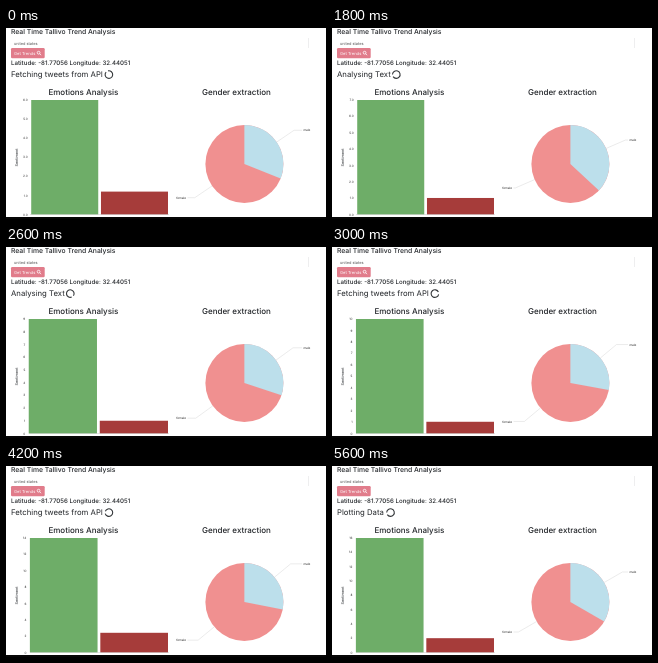
Animation, 320 px wide and 191 px high, one loop 5.7 s. Source, as an HTML page:

```html
<!DOCTYPE html>
<html lang="en">
<head>
<meta charset="utf-8">
<title>Trend Analysis</title>
<style>
  html, body { margin: 0; width: 100%; height: 100%; overflow: hidden; background: #fff; }
  svg {
    display: block; width: 100%; height: 100%; fill: #222529;
    font-family: Inter, "Liberation Sans", sans-serif; text-rendering: geometricPrecision;
  }
  .medium { font-weight: 500; }
  .heading { font-size: 8px; font-weight: 500; text-anchor: middle; }
  .small { font-size: 3.1px; fill: #333; }
  .end { text-anchor: end; }
  .leader { fill: none; stroke: #ccc; stroke-width: .4; }
</style>
</head>
<body>
<svg viewBox="0 0 320 191">
  <text class="medium" x="5" y="6.2" font-size="6.8">Real Time Tallivo Trend Analysis</text>
  <path d="M302.5 10V20" stroke="#e2e2e4" stroke-width=".6"/>
  <text x="8" y="16.6" font-size="3.9" fill="#555">united states</text>
  <rect x="5" y="20" width="33.7" height="10.2" rx="1.2" fill="#e17c8b"/>
  <text x="8" y="26.5" font-size="4.1" fill="#fff">Get Trends</text>
  <g fill="none" stroke="#fff" stroke-width=".8">
    <circle cx="32.6" cy="24.7" r="1.4"/>
    <path d="M33.6 25.7l1.5 1.5"/>
  </g>
  <text class="medium" x="5" y="36.6" font-size="6.15">Latitude: -81.77056 Longitude: 32.44051</text>

  <text id="status" x="5" y="49.4" font-size="7.75"></text>
  <g id="spinner"><path id="ring" fill="none" stroke="#333639" stroke-width="1.1"/></g>

  <text class="heading" x="77.4" y="67.4">Emotions Analysis</text>
  <text class="heading" x="230.4" y="67.4">Gender extraction</text>

  <text transform="translate(12.2 129.5) rotate(-90)" font-size="3.8" text-anchor="middle">Sentiment</text>
  <g id="ticks"></g>
  <rect id="positive" y="72" height="114.5" fill="#6ead68"/>
  <rect id="negative" fill="#a63c3a"/>
  <path d="M24 186.5H163" stroke="#bbb" stroke-width=".4"/>

  <circle cx="238.4" cy="136" r="39" fill="#f09090"/>
  <path id="maleSlice" fill="#bcdfeb"/>
  <path id="maleLeader" class="leader"/>
  <path id="femaleLeader" class="leader"/>
  <text id="maleLabel" class="small" x="297.4">male</text>
  <text id="femaleLabel" class="small end" x="180">female</text>

  <rect y="189" width="320" height="2" fill="#060606"/>
</svg>
<script>
const LOOP = 5700, STEP = 100, TWEEN = 500;
const PLOT = { top: 72, base: 186.5, right: 162, labelX: 17, labelGap: 3.5, barShare: .49 };
const PIE = { x: 238.4, y: 136, r: 39, labelR: 60 };

const STAGES = {
  fetch: { text: "Fetching tweets from API", x: 102.9 },
  analyse: { text: "Analysing Text", x: 64.3 },
  plot: { text: "Plotting Data", x: 58.5 }
};

// start time, stage
const SCHEDULE = [
  [0, "fetch"], [1000, "analyse"], [1300, "plot"],
  [1500, "fetch"], [1700, "analyse"], [2000, "plot"],
  [2200, "fetch"], [2500, "analyse"], [2700, "plot"],
  [2900, "fetch"], [3800, "analyse"], [4000, "plot"],
  [4200, "fetch"], [4300, "analyse"], [4500, "plot"],
  [4800, "fetch"], [5100, "analyse"], [5500, "plot"]
];

// start time, positive count, negative count, male count
const UPDATES = [
  [-1000, 5, 1, 2], [-100, 6, 1, 2], [1500, 7, 1, 3], [2200, 9, 1, 3],
  [2800, 10, 1, 3], [3100, 10, 2, 3], [4100, 14, 2, 5], [4800, 16, 2, 6]
];

const $ = id => document.getElementById(id);
const set = (id, attrs) => {
  for (const key in attrs) $(id).setAttribute(key, attrs[key]);
};
const latest = (list, t) => list.findLastIndex(item => item[0] <= t);
const mix = (a, b, k) => a + (b - a) * k;
const ease = t => 1 - (1 - Math.min(1, Math.max(0, t / TWEEN))) ** 3;
const ratio = ([, pos, neg]) => neg / pos;
const maleShare = ([, pos, neg, male]) => male / (pos + neg);

// angle runs clockwise from twelve o'clock
const polar = (angle, r, x = PIE.x, y = PIE.y) =>
  (x + r * Math.sin(angle)).toFixed(2) + " " + (y - r * Math.cos(angle)).toFixed(2);

// The plot area starts where the widest axis label ends.
let shownMax = 0;
function drawAxis(max) {
  if (max === shownMax) return;
  shownMax = max;
  const step = max > 10 ? 2 : 1;
  let marks = "";
  for (let v = 0; v <= max; v += step) {
    const y = mix(PLOT.base, PLOT.top, v / max) + 1.1;
    marks += `<text class="small end" y="${y}">${max < 8 ? v.toFixed(1) : v}</text>`;
  }
  $("ticks").innerHTML = marks;
  const labelEnd = PLOT.labelX + $("ticks").getBBox().width;
  const left = labelEnd + PLOT.labelGap;
  const width = (PLOT.right - left) * PLOT.barShare;
  set("ticks", { transform: `translate(${labelEnd} 0)` });
  set("positive", { x: left, width });
  set("negative", { x: PLOT.right - width, width });
}

function drawLeader(name, angle, endX) {
  const y = PIE.y - PIE.labelR * Math.cos(angle);
  set(name + "Leader", { d: `M${polar(angle, PIE.r)}L${polar(angle, PIE.labelR)}H${endX}` });
  set(name + "Label", { y: y + 1.2 });
}

function drawPie(share) {
  const angle = share * 2 * Math.PI;
  set("maleSlice", {
    d: `M${PIE.x} ${PIE.y}L${polar(0, PIE.r)}A${PIE.r} ${PIE.r} 0 0 1 ${polar(angle, PIE.r)}Z`
  });
  drawLeader("male", angle / 2, 296);
  drawLeader("female", angle / 2 + Math.PI, 181.5);
}

function drawStatus(t) {
  const stage = STAGES[SCHEDULE[latest(SCHEDULE, t)][1]];
  if ($("status").textContent !== stage.text) $("status").textContent = stage.text;
  const turn = 330 + t / LOOP * 12 * 360;
  set("spinner", { transform: `translate(${stage.x} 46.6) rotate(${turn})` });
}

function draw(t) {
  const i = latest(UPDATES, t);
  const from = UPDATES[i - 1], to = UPDATES[i];
  const barStart = Math.max(0, to[0]);
  const height = (PLOT.base - PLOT.top) * mix(ratio(from), ratio(to), ease(t - barStart));
  set("negative", { y: PLOT.base - height, height });
  drawAxis(to[1]);
  drawPie(mix(maleShare(from), maleShare(to), ease(t - to[0])));
  drawStatus(t);
}

set("ring", { d: `M${polar(.3, 3.8, 0, 0)}A3.8 3.8 0 1 1 ${polar(-.3, 3.8, 0, 0)}` });

const start = performance.now();
function frame() {
  const t = (performance.now() - start) % LOOP;
  draw(Math.floor(t / STEP) * STEP);
  requestAnimationFrame(frame);
}
frame();
</script>
</body>
</html>
```
